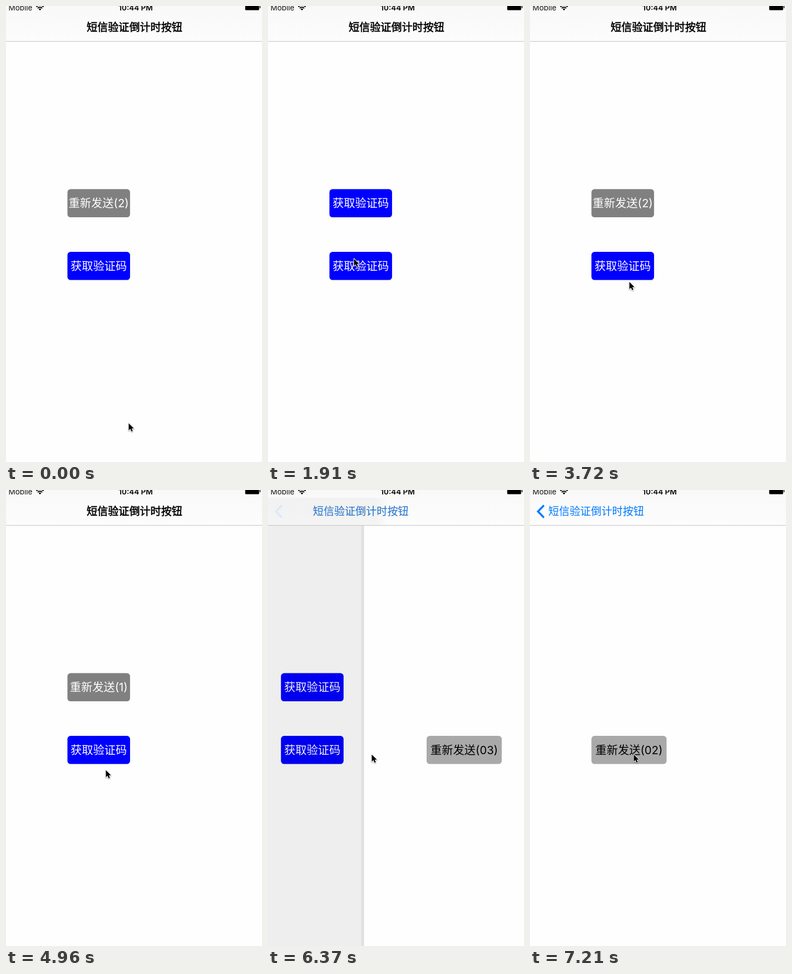
Animation, 460 px wide and 818 px high, one loop 8000 ms. Source, as an HTML page with a canvas:

```html
<!DOCTYPE html>
<html lang="zh-CN">
<head>
<meta charset="utf-8">
<title>短信验证倒计时按钮</title>
<style>
  html, body { margin: 0; width: 100%; height: 100%; overflow: hidden; background: #fefefe; }
  canvas { display: block; }
</style>
</head>
<body>
<canvas id="stage" width="460" height="818"></canvas>
<script>
const ctx = document.getElementById('stage').getContext('2d');
const W = 460, H = 818, LOOP = 8000, TICK = 57.5;
const TITLE = '短信验证倒计时按钮', READY = '获取验证码';
const FAMILY = 'Inter, "Noto Sans CJK SC", "Noto Sans CJK", sans-serif';

// Each move: key points as [time, x, y], sampled once per tick.
const moves = [
  { keys: [[-10, 220.5, 748.5], [50, 225, 752], [110, 236, 760], [222, 246.5, 767]] },
  { keys: [[1622, 246.5, 767], [1680, 239, 735], [1795, 190, 560], [1910, 154.5, 453.5],
           [2025, 152.5, 396], [2140, 158, 366], [2255, 161.5, 358.5]] },
  { keys: [[3030, 161.5, 358.5], [3830, 179.5, 502.5]], ease: true },
  { keys: [[5675, 179.5, 502.5], [6075, 186.5, 474.5]], ease: true }
];
const moveStarts = [50, 1680, 3030, 5730];
const pushTimes = [6290, 6370, 6490, 6600, 6710, 6820];

// Label of the upper button by start time; empty means ready.
const labels = [[0, '2'], [110, '1'], [1080, ''], [2430, '3'], [3432, '2'], [4420, '1'], [5370, '']];

const mix = (a, b, k) => a + (b - a) * k;
const lastBefore = (list, t) => list.filter(item => item <= t).pop();

function cursorAt(t) {
  const index = moveStarts.filter(start => start <= t).length - 1;
  if (index < 0) return moves[0].keys[0].slice(1);
  const { keys, ease } = moves[index];
  const start = moveStarts[index];
  const time = start + Math.floor((t - start + 0.01) / TICK) * TICK;
  const next = keys.findIndex(key => key[0] > time);
  if (next < 0) return keys[keys.length - 1].slice(1);
  if (next === 0) return keys[0].slice(1);
  const a = keys[next - 1], b = keys[next];
  let k = (time - a[0]) / (b[0] - a[0]);
  if (ease) k = k * k * (3 - 2 * k);
  return [mix(a[1], b[1], k), mix(a[2], b[2], k)];
}

// Critically damped spring, held between screen updates.
function pushAt(t) {
  const time = lastBefore(pushTimes, t);
  if (time === undefined) return 0;
  if (time === 6820) return 1;
  const s = (time - 6250) / 1000 * 17.5;
  return 1 - (1 + s) * Math.exp(-s);
}

function text(str, x, y, size, color, weight = 400, align = 'left') {
  ctx.font = `${weight} ${size}px ${FAMILY}`;
  ctx.textAlign = align;
  ctx.fillStyle = color;
  ctx.fillText(str, x, y);
}

function rect(x, y, w, h, color) {
  ctx.fillStyle = color;
  ctx.fillRect(x, y, w, h);
}

function button(x, y, w, label, fill, color) {
  ctx.fillStyle = fill;
  ctx.beginPath();
  ctx.roundRect(x, y, w, 50.6, 5.6);
  ctx.fill();
  text(label, x + w / 2, y + 32.7, 20.25, color, 400, 'center');
}

function statusBar() {
  text('Mobile', 4.5, 8, 13.5, '#111');
  text('10:44 PM', 233, 8, 13.5, '#000', 600, 'center');
  ctx.strokeStyle = ctx.fillStyle = '#000';
  ctx.lineWidth = 2;
  for (const r of [5.7, 9.2]) {
    ctx.beginPath();
    ctx.arc(61, 8, r, -Math.PI * 0.75, -Math.PI * 0.25);
    ctx.stroke();
  }
  ctx.beginPath();
  ctx.moveTo(61, 8);
  ctx.arc(61, 8, 3.2, -Math.PI * 0.75, -Math.PI * 0.25);
  ctx.fill();
  ctx.beginPath();
  ctx.roundRect(429.8, -4, 25, 11.6, 1.5);
  ctx.fill();
  rect(455.8, 0, 1.4, 4, '#000');
}

function navTitle(p) {
  const x = mix(145, 33, p < 1 ? p * 0.925 : 1);
  ctx.globalAlpha = 1 - p ** 1.25;
  text(TITLE, x, 45, 19.1, '#000');
  // A thin outline gives a medium weight before the title becomes a back label.
  if (p === 0) {
    ctx.strokeStyle = '#000';
    ctx.lineWidth = 0.6;
    ctx.strokeText(TITLE, x, 45);
  }
  ctx.globalAlpha = p ** 0.8;
  text(TITLE, x, 45, 19.1, '#007aff');
  ctx.globalAlpha = p ** 5;
  ctx.strokeStyle = '#007aff';
  ctx.lineWidth = 3.4;
  ctx.beginPath();
  ctx.moveTo(25, 27.5);
  ctx.lineTo(14.3, 38.5);
  ctx.lineTo(25, 49.5);
  ctx.stroke();
  ctx.globalAlpha = 1;
}

function navBar(p, edge) {
  const glass = ctx.createLinearGradient(0, 0, 0, 63);
  glass.addColorStop(0, '#f9f9f9');
  glass.addColorStop(1, '#fcfcfc');
  rect(0, 0, W, 63, glass);
  if (p > 0 && p < 1) {
    const shade = ctx.createLinearGradient(edge + 20, 0, edge + 40, 0);
    shade.addColorStop(0, `rgba(0,0,0,${0.05 * p})`);
    shade.addColorStop(1, 'rgba(0,0,0,0)');
    rect(0, 14, W, 49, shade);
  }
  rect(0, 63, W, 1, '#c4c4c4');
  statusBar();
  navTitle(p);
}

function firstPage(t, shift) {
  const count = labels.filter(item => item[0] <= t).pop()[1];
  const x = 110.4 - shift;
  button(x, 328.5, 112.5, count ? `重新发送(${count})` : READY, count ? '#808080' : '#00f', '#fff');
  button(x, 441, 112.5, READY, '#00f', '#fff');
}

function secondPage(t, p, x) {
  rect(0, 0, W, H, `rgba(0,0,0,${0.104 * p})`);
  if (p < 1) rect(x - 7, 64, 5, H, 'rgba(0,0,0,0.06)');
  rect(x - 2, 0, W + 2, H, '#fefefe');
  button(x + 110.4, 441, 135, `重新发送(${t < 7210 ? '03' : '02'})`, '#a9a9a9', '#000');
}

function pointer(x, y) {
  const outline = [[0, 0], [0, 14.2], [3.3, 11.2], [5.6, 16.4], [8, 15.3], [5.8, 10.3], [10.2, 10.3]];
  ctx.save();
  ctx.translate(x, y);
  ctx.scale(0.9, 0.9);
  ctx.beginPath();
  outline.forEach(([px, py]) => ctx.lineTo(px, py));
  ctx.closePath();
  ctx.lineJoin = 'round';
  ctx.lineWidth = 2;
  ctx.strokeStyle = '#fff';
  ctx.shadowColor = 'rgba(0,0,0,0.4)';
  ctx.shadowBlur = 2;
  ctx.shadowOffsetY = 1;
  ctx.stroke();
  ctx.shadowColor = 'transparent';
  ctx.fillStyle = '#000';
  ctx.fill();
  ctx.restore();
}

function draw(t) {
  const p = pushAt(t);
  const edge = W * (1 - p);
  rect(0, 0, W, H, '#fefefe');
  firstPage(t, 140.4 * p);
  if (p > 0) secondPage(t, p, edge);
  navBar(p, edge);
  pointer(...cursorAt(t));
}

const begin = performance.now();
function frame() {
  draw((performance.now() - begin) % LOOP);
  requestAnimationFrame(frame);
}
frame();
</script>
</body>
</html>
```
